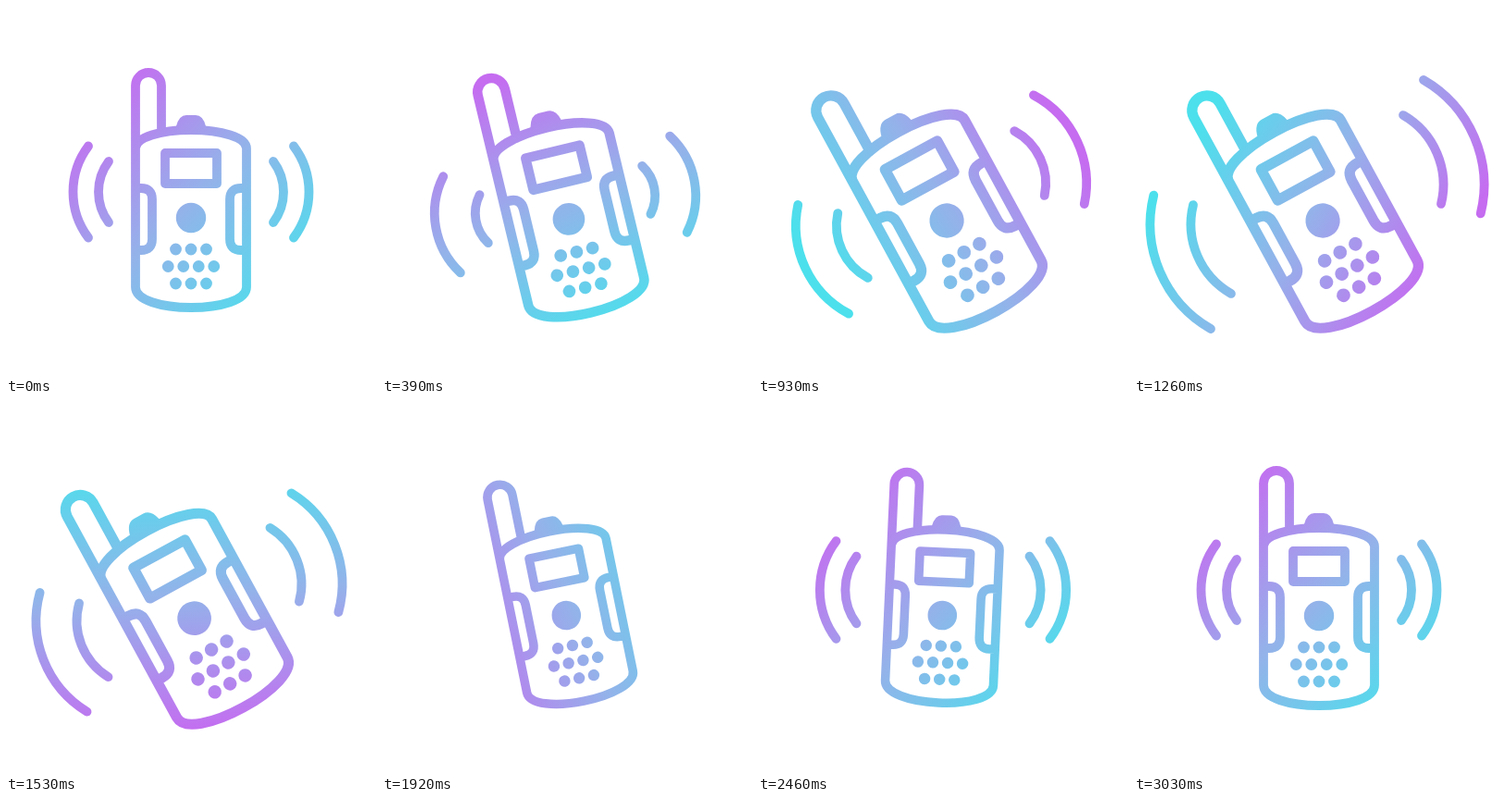
Animation of 400 by 400 pixels, one loop 3.09 s. Source, as an HTML page with a canvas:

```html
<!DOCTYPE html>
<html>
<head>
<meta charset="utf-8">
<style>
html, body { margin: 0; height: 100%; overflow: hidden; background: #fff; }
canvas { display: block; width: 100vmin; height: 100vmin; margin: auto; }
</style>
</head>
<body>
<canvas id="stage" width="400" height="400"></canvas>
<script>
const LOOP = 3090;
const ctx = document.getElementById('stage').getContext('2d');
const rad = Math.PI / 180;

const progress = (t, from, to) => Math.min(1, Math.max(0, (t - from) / (to - from)));
const bump = (t, from, to) => Math.sin(Math.PI * progress(t, from, to));
function ease(t, from, to) {
  const u = progress(t, from, to);
  return u * u * (3 - 2 * u);
}

const outline = new Path2D(`
  M140 154 C140 142 167 134 200 134 S260 142 260 154
  V304 C260 318 232 326 200 326 S140 318 140 304 Z
  M140 154 V86 a14 14 0 0 1 28 0 V137
  M172 159 h56 v33 h-56 Z
  M140 197 h6 q12 0 12 12 v43 q0 12 -12 12 h-6
  M260 197 h-6 q-12 0 -12 12 v43 q0 12 12 12 h6`);

const solid = new Path2D('M184 133 v-3 q3 -12 11 -12 h10 q8 0 11 12 v3 Z');
function dot(x, y, r) {
  solid.moveTo(x + r, y);
  solid.arc(x, y, r, 0, 7);
}
dot(200, 229, 16.2);
for (let row = 0; row < 3; row++) {
  const count = 3 + row % 2;
  for (let i = 0; i < count; i++) dot(200 + (i - (count - 1) / 2) * 16.5, 263 + row * 18.5, 6.4);
}

// Leans left while growing, then swings back slightly past upright.
function drawRadio(t) {
  const lean = ease(t, 0, 810) - ease(t, 1530, 2220);
  const angle = 2.6 * bump(t, 2200, 2720) - 28.6 * lean;
  const scale = 1 + 0.15 * ease(t, 0, 810) - 0.175 * ease(t, 1440, 1920) + 0.025 * ease(t, 2460, 2720);
  ctx.save();
  ctx.translate(200 + 27 * (scale - 1), 229 + 20 * (scale - 1));
  ctx.rotate(angle * rad);
  ctx.scale(scale, scale);
  ctx.translate(-200, -229);
  ctx.stroke(outline);
  ctx.fill(solid);
  ctx.restore();
}

// Arcs pulse during the lean, vanish, and pop back with a small overshoot.
function drawWaves(t) {
  const active = ease(t, 0, 390) - ease(t, 1890, 2150);
  const swell = ease(t, 300, 600) - ease(t, 1730, 1890);
  const pulse = 40 + 14.5 * Math.cos(2 * Math.PI * (t - 655) / 525);
  const size = 1 - 0.5 * (ease(t, 1730, 1890) - ease(t, 2150, 2300));
  const angle = 4 * ease(t, 800, 1700) + 21.2 * ease(t, 1800, 2150) - 25.2 * ease(t, 0, 900);
  const outer = 82.5 + swell * pulse + 11 * bump(t, 2170, 2520);
  const gap = 27.5 + 16.5 * active;
  const spread = 36.9 * rad;
  ctx.save();
  ctx.globalAlpha = 1 - ease(t, 1750, 1890) + ease(t, 2150, 2250);
  ctx.translate(200 - 2 * active, 201 + 13.5 * active);
  ctx.rotate(angle * rad);
  for (let side = 0; side < 2; side++) {
    for (const r of [outer, outer - gap]) {
      ctx.beginPath();
      ctx.arc(45 + 9 * active, 0, r * size, -spread, spread);
      ctx.stroke();
    }
    ctx.rotate(Math.PI);
  }
  ctx.restore();
}

// The shapes act as a mask for one gradient that makes a full turn.
function paint(t) {
  const turn = (45 + 360 * ease(t, 0, 2650)) * rad;
  const dx = 150 * Math.cos(turn), dy = 150 * Math.sin(turn);
  const fill = ctx.createLinearGradient(200 - dx, 208 - dy, 200 + dx, 208 + dy);
  fill.addColorStop(0, '#c56cf0');
  fill.addColorStop(0.5, '#94b2ea');
  fill.addColorStop(1, '#4ce0ec');
  ctx.save();
  ctx.globalCompositeOperation = 'source-in';
  ctx.fillStyle = fill;
  ctx.fillRect(0, 0, 400, 400);
  ctx.restore();
}

function draw(t) {
  ctx.clearRect(0, 0, 400, 400);
  ctx.lineWidth = 9.8;
  ctx.lineCap = ctx.lineJoin = 'round';
  drawRadio(t);
  drawWaves(t);
  paint(t);
}

let start;
function tick(now) {
  start ??= now;
  draw((now - start) % LOOP);
  requestAnimationFrame(tick);
}
draw(0);
requestAnimationFrame(tick);
</script>
</body>
</html>
```
